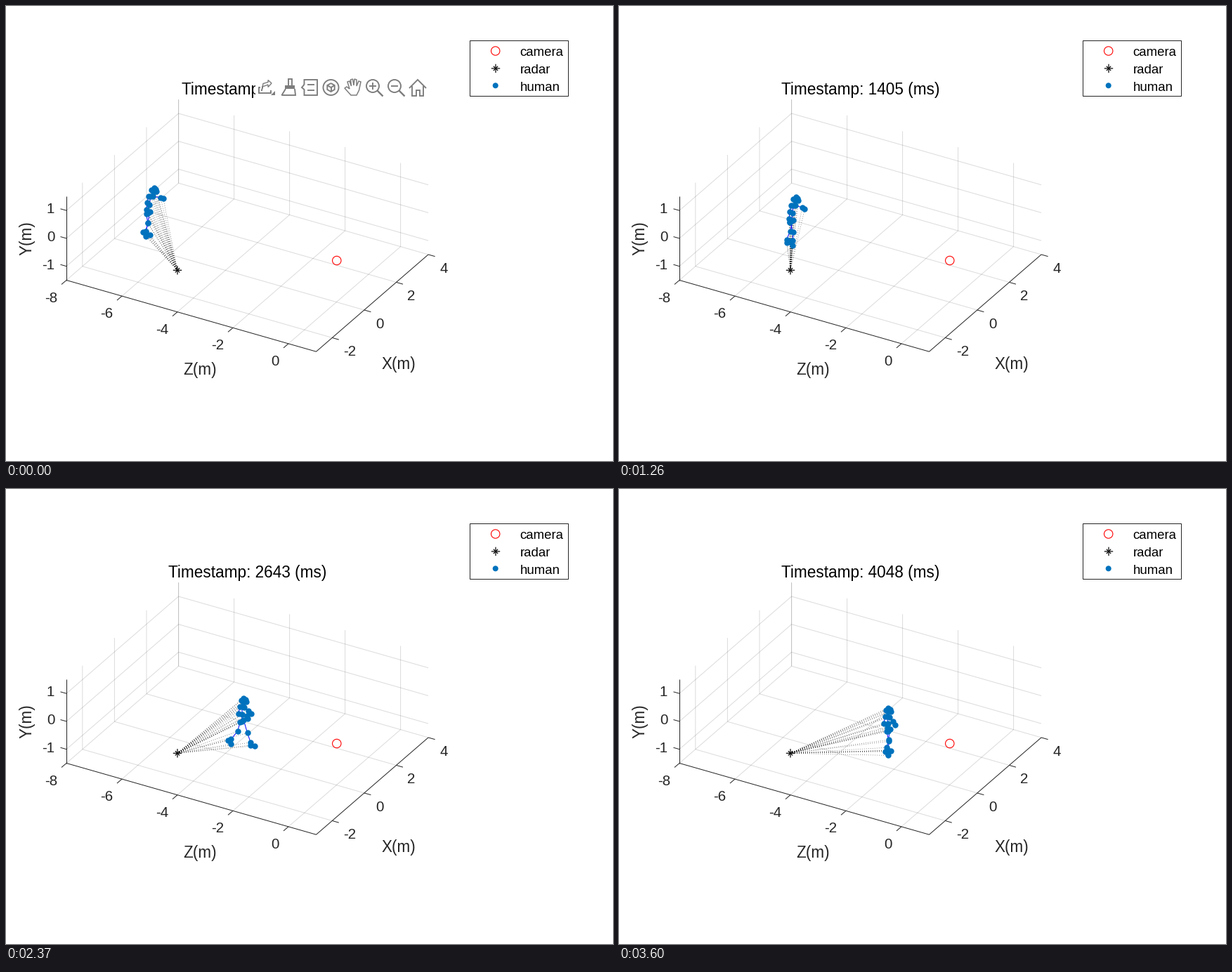
Animation, 864 px wide and 648 px high, one loop 3630 ms. Source, as a matplotlib script:

```python
import math

import matplotlib.pyplot as plt
import numpy as np
from matplotlib.animation import FuncAnimation
from matplotlib.collections import LineCollection
from matplotlib.patches import Circle, Polygon, Rectangle

plt.rcParams["font.family"] = "Liberation Sans"

W, H, DPI = 864, 648, 72          # at 72 dpi one point is one pixel
FRAMES, STEP = 121, 30
INK, ICON, BLUE = "#262626", "#7d7d7d", "#0072BD"
GRID = (0.15, 0.15, 0.15, 0.16)
RADAR = (244, 376.3)

fig = plt.figure(figsize=(W / DPI, H / DPI), dpi=DPI, facecolor="white")
ax = fig.add_axes([0, 0, 1, 1])
ax.set_xlim(0, W)
ax.set_ylim(H, 0)
ax.axis("off")


def line(points, color=INK, width=1.0, z=2, **kw):
    xs, ys = zip(*points)
    return ax.plot(xs, ys, color=color, lw=width, zorder=z,
                   solid_capstyle="butt", solid_joinstyle="miter", **kw)[0]


def label(x, y, text, size, ha="left", color=INK):
    return ax.text(x, y, text, fontsize=size, ha=ha, va="baseline",
                   color=color, zorder=6)


def project(x, y, z):
    """Orthographic view of the room, in pixels."""
    return (86 + 39.5 * (z + 8) + 22.8 * (x + 3),
            390.5 + 11.3 * (z + 8) - 19.75 * (x + 3) - 39.7 * (y + 1.5))


def ring(x, y):
    ax.add_patch(Circle((x, y), 6.2, fill=False, ec="red", lw=1.1, zorder=5))


def star(x, y, r=6.2):
    for k in range(4):
        a = k * math.pi / 4
        s = r if k % 2 == 0 else r * 0.72
        dx, dy = s * math.cos(a), s * math.sin(a)
        line([(x - dx, y - dy), (x + dx, y + dy)], "black", 1.2, 5, snap=False)


# Room: grid, axes, ticks

def draw_room():
    for z in range(-8, 1, 2):
        line([project(-3, -1.5, z), project(4, -1.5, z), project(4, 1.5, z)], GRID)
    for x in range(-2, 5, 2):
        line([project(x, 1.5, -8), project(x, -1.5, -8), project(x, -1.5, 1)], GRID)
    for y in (-1, 0, 1):
        line([project(-3, y, -8), project(4, y, -8), project(4, y, 1)], GRID)

    line([project(-3, 1.5, -8), project(-3, -1.5, -8)])
    line([project(-3, -1.5, -8), project(-3, -1.5, 1), project(4, -1.5, 1)])

    for y in (-1, 0, 1):
        px, py = project(-3, y, -8)
        line([(px, py), (px - 8.5, py - 2.4)])
        label(px - 16.7, py + 4.2, str(y), 20.5, "right")
    for z in range(-8, 1, 2):
        px, py = project(-3, -1.5, z)
        line([(px, py), (px - 7, py + 6)])
        label(px - 12.8, py + 31, str(z), 20.5, "right")
    for x in range(-2, 5, 2):
        px, py = project(x, -1.5, 1)
        line([(px, py), (px + 9.5, py + 2.7)])
        label(px + 16, py + 26, str(x), 20.5)

    label(276.5, 524.5, "Z(m)", 22.5, "center")
    label(559, 516.5, "X(m)", 22.5, "center")
    ax.text(41.2, 330.5, "Y(m)", fontsize=22.5, rotation=90, color=INK,
            ha="right", va="center", zorder=6)


def draw_legend():
    ax.add_patch(Rectangle((660, 49), 140, 79, fc="white", ec=INK, lw=1))
    ring(696.7, 64)
    star(697, 88.9)
    ax.add_patch(Circle((696.7, 113.3), 4, color=BLUE, lw=0, zorder=5))
    for row, text in enumerate(("camera", "radar", "human")):
        label(731.3, 71 + 25 * row, text, 18.6, color="black")


# Figure toolbar, visible only at the start

def draw_toolbar():
    parts = [ax.add_patch(Rectangle((355, 102), 246, 29, fc="white", lw=0, zorder=7))]

    def stroke(*points, width=1.9):
        parts.append(line(points, ICON, width, 8))

    def disc(x, y, r):
        parts.append(ax.add_patch(
            Circle((x, y), r, fill=False, ec=ICON, lw=1.9, zorder=8)))

    def solid(*points):
        parts.append(ax.add_patch(Polygon(points, fc=ICON, lw=0, zorder=8)))

    # export
    stroke((362, 116), (359.5, 116), (359.5, 124), (377, 124), (377, 120))
    stroke((364, 121), (365, 115), (373, 112), (373, 115.5), (378, 110),
           (373, 105.5), (373, 108.5), (366, 110.5), (364, 121), width=1.4)
    solid((377, 126.5), (383, 126.5), (383, 120.5))
    # brush
    stroke((402, 114), (402, 104), (407, 104), (407, 114))
    solid((397, 113), (411, 113), (411, 118), (397, 118))
    stroke((398, 118), (392.5, 127), (412, 127), (411, 118))
    # data tip
    stroke((424.5, 112), (424.5, 105), (443, 105), (443, 127), (424.5, 127),
           (424.5, 119), (421, 116), (424.5, 112))
    for y in (111.5, 119.5):
        stroke((429, y), (439, y))
    # rotate
    disc(462.5, 116, 11)
    cube = [(462.5 + 6 * math.sin(k * math.pi / 3),
             116 - 6 * math.cos(k * math.pi / 3)) for k in range(7)]
    stroke(*cube)
    for corner in cube[1::2]:
        stroke((462.5, 116), corner)
    # pan
    stroke((489, 118), (486, 108), (489, 107), (491.5, 114), (490.5, 105),
           (493.5, 104), (495, 113), (496, 104), (499, 105), (499, 114),
           (502, 107), (505, 108), (502.5, 120), (499, 127), (491, 127),
           (482, 117), (485, 115), (489, 118), width=1.5)
    # zoom in, zoom out
    for x in (522, 553):
        disc(x, 114, 9)
        stroke((x + 6.4, 120.4), (x + 14.5, 128.5), width=2.4)
        stroke((x - 5, 114), (x + 5, 114))
    stroke((522, 109), (522, 119))
    # home
    stroke((574, 117), (586, 105), (598, 117))
    stroke((578, 114), (578, 128), (583.5, 128), (583.5, 120), (589, 120),
           (589, 128), (594, 128), (594, 114))
    return parts


# Walking figure

CHAINS = ("head chin neck spine hip", "shoulder_l neck shoulder_r",
          "shoulder_l elbow_l wrist_l hand_l", "shoulder_r elbow_r wrist_r",
          "hip_l hip hip_r", "hip_l knee_l foot_l heel_l", "foot_l toe_l",
          "hip_r knee_r foot_r heel_r", "foot_r toe_r")


def smooth(u):
    u = min(max(u, 0), 1)
    return u * u * (3 - 2 * u)


def pose(t):
    """Joint positions in pixels: a straight eased walk with a growing stride."""
    way = smooth((t - 240) / 3200)
    gait = smooth((t - 700) / 1500)
    phase = 2 * math.pi * (t - 1640) / 715
    swing, lift = math.cos(phase), math.sin(phase)
    joints = {}

    def put(name, base, dx, dy):
        joints[name] = joints[base] + (dx, dy)

    joints["neck"] = np.array([206 + 176 * way, 270.8 + 53.5 * way])
    put("head", "neck", 4.5 - 3.5 * way, -11.5 - way)
    put("ear_l", "head", -3.5, 3)
    put("eye", "head", 2.5, 1.8)
    put("ear_r", "head", 3.5, 5)
    put("chin", "head", -0.5, 5.5)
    put("shoulder_l", "neck", -3, 0)
    put("shoulder_r", "neck", 2.5, 0.5)

    reach = gait * (1 + swing) / 2
    put("elbow_l", "neck", -5.5, 9.5)
    put("wrist_l", "neck", -6 + 13 * reach, 19.5 - 7 * reach)
    put("hand_l", "wrist_l", 1, 4.5)
    put("elbow_r", "neck", 14 - 6.5 * way, 2 + 5 * way)
    put("wrist_r", "elbow_r", 3.8, 1 + 3.5 * way)

    put("hip", "neck", -4 + 5 * way, 24 - 5 * way)
    put("hip_l", "hip", -2.5, 1.2)
    put("hip_r", "hip", 2.5, -1.5)
    joints["spine"] = (joints["neck"] + joints["hip"]) / 2

    for side, sign in (("_l", -1), ("_r", 1)):
        stride = 14 * gait * sign * swing
        rise = 4 * gait * max(0, -sign * lift)
        put("foot" + side, "hip", -3 + 2 * way + stride,
            26 + 3 * way + 0.15 * stride - rise)
        joints["knee" + side] = (joints["hip"] + joints["foot" + side]) / 2 + (1.5, 1.5)
    put("heel_l", "foot_l", -4, 1.5)
    put("toe_l", "foot_l", 0, 7)
    put("heel_r", "foot_r", 0, 4)
    put("toe_r", "foot_r", 6, 4.7)
    return joints


draw_room()
draw_legend()
ring(470.8, 362.5)
star(*RADAR)
toolbar = draw_toolbar()
title = label(343.8, 126, "", 22.6, "center", "black")
rays = ax.add_collection(LineCollection(
    [], colors=[(0, 0, 0, 0.55)], linewidths=0.75, linestyles=[(0, (1.3, 2.7))], zorder=3))
bones = ax.add_collection(LineCollection([], colors="#0000ff", linewidths=1.0, zorder=4))
dots, = ax.plot([], [], "o", ms=8.4, mew=0, color=BLUE, zorder=5)


def update(i):
    joints = pose(i * STEP)
    points = np.array(list(joints.values()))
    rays.set_segments([(RADAR, p) for p in points])
    bones.set_segments([[joints[n] for n in chain.split()] for chain in CHAINS])
    dots.set_data(points[:, 0], points[:, 1])
    tick = i + (i > 110)
    title.set_text(f"Timestamp: {round(tick * 4048 / 121)} (ms)")
    for part in toolbar:
        part.set_visible(i == 0)
    return [rays, bones, dots, title, *toolbar]


anim = FuncAnimation(fig, update, frames=FRAMES, interval=STEP,
                     init_func=lambda: update(0), repeat=True, repeat_delay=0, blit=False)
plt.show()
```
